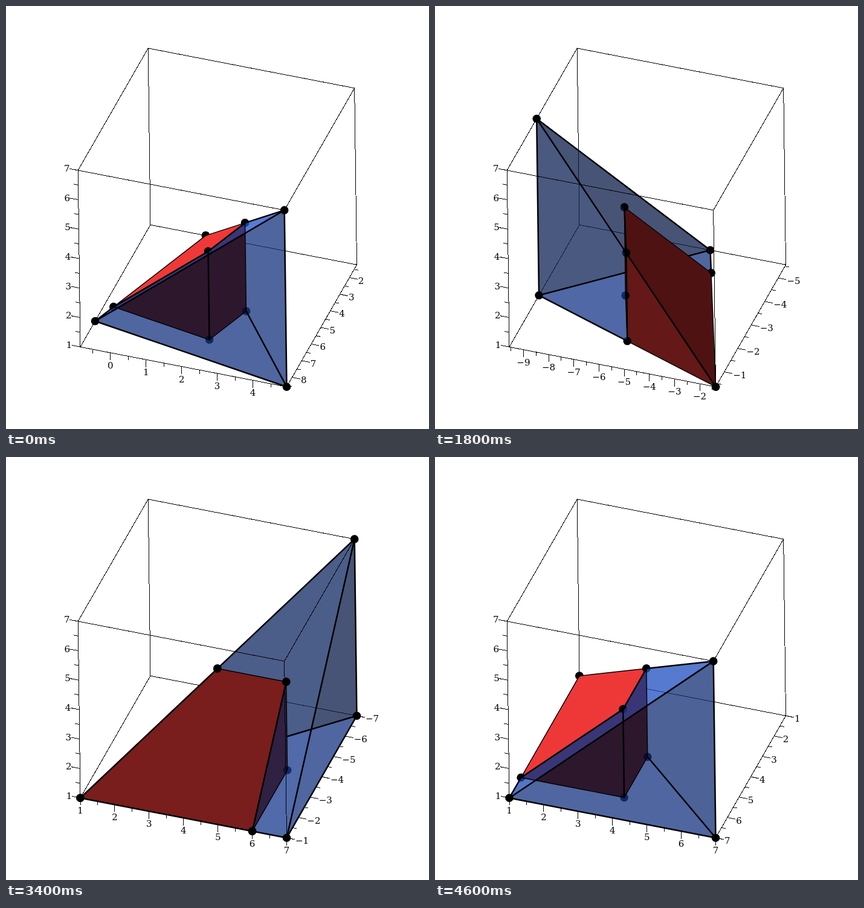
Write an HTML page that moves like this. It is 700x700 px and loops after 4800 ms.

```html
<!DOCTYPE html>
<html lang="en">
<head>
<meta charset="utf-8">
<title>Rotating solids</title>
<style>
html, body { margin: 0; width: 100%; height: 100%; overflow: hidden; background: #fff; }
svg { display: block; width: 100%; height: 100%; }
text { font: 15px "DejaVu Serif", "Noto Serif", serif; }
line { stroke: #000; stroke-linecap: round; }
.thin { stroke-width: 1; shape-rendering: crispEdges; }
</style>
</head>
<body>
<svg id="stage" viewBox="0 0 700 700"></svg>
<script>
const STEP_MS = 200, STEPS = 24;
const stage = document.getElementById('stage');

// Affine view of the unit plot box and the direction towards the viewer
const ORIGIN = [239, 362.2], AXES = [[341.5, 66], [-116, 202], [-3.8, -292.3]];
const VIEW = [0.265, 0.764, 0.588];
const LIGHT = [-0.522, -0.125, 0.365], AMBIENT = 0.306;
const RED = [255, 60, 60], BLUE = [40, 96, 236], BLUE_ALPHA = 0.5;
const DOT = 6.8, THICK = 2.5, FINE = 1.4;

const POINTS = [[1, 1, 1], [1, 7, 1], [7, 7, 1], [7, 7, 7], [4, 4, 4],
                [4, 6, 4], [4, 6, 1], [1, 6, 1], [4, 4, 1]];
const NORMALS = { top: [-1, 0, 1], bottom: [0, 0, -1], diag: [1, -1, 0], far: [0, 1, 0], side: [1, 0, 0] };
const RED_FACES = { top: [0, 4, 5, 7], bottom: [0, 8, 6, 7], diag: [0, 4, 8], side: [4, 5, 6, 8], far: [5, 6, 7] };
// Blue faces are listed in blending order
const BLUE_FACES = { far: [1, 2, 3], diag: [8, 2, 3, 4], top: [7, 5, 4, 3, 1], bottom: [1, 2, 8, 6, 7] };
const RED_EDGES = sharedEdges(RED_FACES), BLUE_EDGES = sharedEdges(BLUE_FACES);

function sharedEdges(faces) {
  const found = {};
  for (const [name, ids] of Object.entries(faces)) {
    ids.forEach((a, i) => {
      const b = ids[(i + 1) % ids.length];
      const key = [a, b].sort().join();
      (found[key] ||= { a, b, sides: [] }).sides.push(name);
    });
  }
  return Object.values(found).filter(e => e.sides.length === 2);
}

const dot = (a, b) => a.reduce((sum, x, i) => sum + x * b[i], 0);
const project = p => [0, 1].map(k => ORIGIN[k] + AXES.reduce((sum, axis, i) => sum + axis[k] * p[i], 0));
const line = (a, b, attrs) =>
  `<line x1="${a[0].toFixed(2)}" y1="${a[1].toFixed(2)}" x2="${b[0].toFixed(2)}" y2="${b[1].toFixed(2)}" ${attrs}/>`;
const thin = (a, b) => line(a, b, 'class="thin"');
const shift = (p, v, k) => [p[0] + v[0] * k, p[1] + v[1] * k];

function boxEdges(isBack) {
  let out = '';
  for (let axis = 0; axis < 3; axis++) {
    for (let n = 0; n < 4; n++) {
      if ((n === 0) !== isBack) continue;
      const from = [n & 1, n >> 1];
      from.splice(axis, 0, 0);
      const to = from.slice();
      to[axis] = 1;
      out += thin(project(from), project(to));
    }
  }
  return out;
}

function ticks([lo, hi], place, dir, label) {
  let out = '';
  for (let h = Math.ceil(lo * 2 - 1e-6); h <= hi * 2 + 1e-6; h++) {
    const p = project(place((h / 2 - lo) / (hi - lo))), major = h % 2 === 0;
    out += thin(p, shift(p, dir, major ? 1 : 0.5));
    if (!major) continue;
    const name = (h < 0 ? '\u2212' : '') + Math.abs(h / 2);
    out += `<text x="${p[0] + label[0]}" y="${p[1] + label[1]}" text-anchor="${label[2]}">${name}</text>`;
  }
  return out;
}

// The part of a dot that rises above a plane with the given normal
function risingDot(center, normal, facing) {
  const tip = project(normal.map((v, i) => v - facing * VIEW[i]));
  const heading = Math.atan2(tip[1] - ORIGIN[1], tip[0] - ORIGIN[0]);
  const spread = Math.PI / 2 + Math.asin(Math.min(0.99, facing / Math.sqrt(1 - facing * facing)));
  const [from, to] = [-spread, spread].map(a =>
    shift(center, [Math.cos(heading + a), Math.sin(heading + a)], DOT).map(v => v.toFixed(2)));
  return `<path d="M${from}A${DOT} ${DOT} 0 1 1 ${to}Z"/>`;
}

function render(step) {
  const angle = (step + 1) * Math.PI / 12, c = Math.cos(angle), s = Math.sin(angle);
  const turn = ([x, y, z]) => [x * c - y * s, x * s + y * c, z];
  const solid = POINTS.map(turn);
  const range = [0, 1, 2].map(i => {
    const values = solid.map(p => p[i]);
    return [Math.min(...values), Math.max(...values)];
  });
  const pts = solid.map(p => project(p.map((v, i) => (v - range[i][0]) / (range[i][1] - range[i][0]))));

  const normal = {}, facing = {}, shade = {};
  for (const name in NORMALS) {
    const n = turn(NORMALS[name]).map((v, i) => v * (range[i][1] - range[i][0]));
    const size = Math.hypot(...n);
    normal[name] = n.map(v => v / size);
    facing[name] = dot(normal[name], VIEW);
    shade[name] = AMBIENT + Math.max(0, dot(normal[name], LIGHT) * Math.sign(facing[name]));
  }
  const isFront = name => facing[name] > 0;
  const tint = (base, name) => `rgb(${base.map(v => Math.round(Math.min(255, v * shade[name])))})`;
  const path = ids => 'M' + ids.map(i => pts[i].map(v => v.toFixed(2))).join('L') + 'Z';
  const edge = (e, width) => line(pts[e.a], pts[e.b], `stroke-width="${width}"`);

  const redFront = Object.keys(RED_FACES).filter(isFront);
  const outline = redFront.map(name => path(RED_FACES[name])).join('');
  const frontAt = (faces, i) => Object.keys(faces).filter(name => isFront(name) && faces[name].includes(i));
  const spots = { hidden: '', red: '', front: '' };
  pts.forEach((p, i) => {
    const onBlue = i > 0 && i < 4;
    const around = frontAt(onBlue ? BLUE_FACES : RED_FACES, i);
    const onTop = !onBlue && around.includes('top');
    const buried = around.length === 0 || (onTop && around.length === 1);
    const layer = buried ? 'hidden' : onBlue ? 'front' : 'red';
    spots[layer] += `<circle cx="${p[0].toFixed(2)}" cy="${p[1].toFixed(2)}" r="${DOT}"/>`;
    if (onTop) spots.front += risingDot(p, normal.top, facing.top);
  });

  const redFaces = redFront.map(name => `<path d="${path(RED_FACES[name])}" fill="${tint(RED, name)}"/>`).join('');
  const redEdges = RED_EDGES.filter(e => e.sides.some(isFront)).map(e => {
    const onRim = [e.a, e.b].includes(0) && e.sides.includes('top') && facing.top > 0.8;
    return edge(e, e.sides.every(isFront) || onRim ? THICK : FINE);
  }).join('');
  const blueFaces = Object.entries(BLUE_FACES).map(([name, ids]) =>
    `<path d="${path(ids)}" fill="${tint(BLUE, name)}" fill-opacity="${BLUE_ALPHA}"` +
    (isFront(name) ? '' : ' clip-path="url(#outside)"') + '/>').join('');
  const blueEdges = front => BLUE_EDGES.filter(e => e.sides.some(isFront) === front).map(e => edge(e, THICK)).join('');

  stage.innerHTML =
    `<defs><clipPath id="outside"><path clip-rule="evenodd" d="M0 0H700V700H0Z${outline}"/></clipPath></defs>` +
    boxEdges(true) + spots.hidden + redFaces + spots.red + blueFaces +
    `<g clip-path="url(#outside)">${blueEdges(false)}</g>` + redEdges + blueEdges(true) + spots.front + boxEdges(false) +
    ticks(range[0], t => [t, 1, 0], [0, 12], [0, 26, 'middle']) +
    ticks(range[1], t => [1, t, 0], [13, 2.6], [14.5, 10, 'start']) +
    ticks(range[2], t => [0, 1, t], [-14, -2.7], [-18.5, 2, 'middle']);
}

let shown = -1;
const start = performance.now();
function tick() {
  const step = Math.floor((performance.now() - start) / STEP_MS) % STEPS;
  if (step !== shown) render(shown = step);
  requestAnimationFrame(tick);
}
tick();
</script>
</body>
</html>
```
